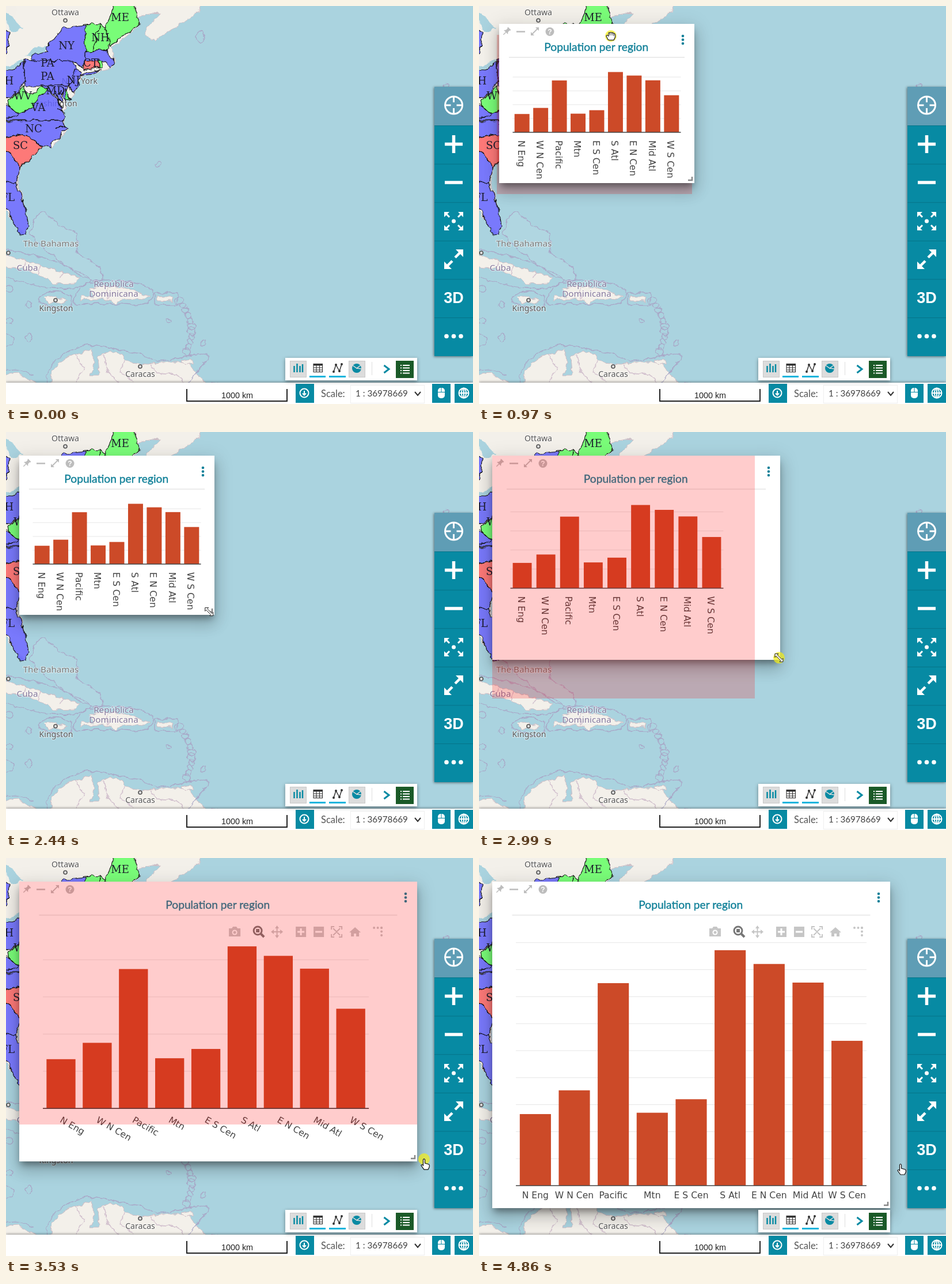
An HTML page for the animation above (5.18 s loop, 811x690 px).

```html
<!DOCTYPE html>
<html lang="en">
<head>
<meta charset="utf-8">
<title>Map dashboard</title>
<style>
html, body { margin: 0; width: 811px; height: 690px; overflow: hidden; }
#stage { position: relative; width: 811px; height: 690px; overflow: hidden; background: #aad3df; }
svg { position: absolute; left: 0; top: 0; overflow: visible; }
#panel, #drop { position: absolute; }
#panel {
  background: #fff; z-index: 2;
  box-shadow: 0 8px 11px -3px rgba(0,0,0,.38), 0 16px 24px 2px rgba(0,0,0,.15), 0 6px 30px 5px rgba(0,0,0,.1);
}
#drop { background: rgba(255,0,0,.2); }
#chrome { z-index: 4; }
#pointer { z-index: 5; }
.land { fill: #f3f0ea; stroke: #cdbcc4; stroke-width: 1; }
.sea { fill: none; stroke: #a9a5c6; stroke-width: 1.3; }
.inner { stroke: #cfbccb; }
.state { stroke: #111; stroke-width: 1.1; stroke-linejoin: round; }
.blue { fill: rgba(98,98,255,.84); }
.green { fill: rgba(98,255,98,.84); }
.red { fill: rgba(255,98,98,.84); }
.abbr { font: 18px "DejaVu Serif", serif; fill: #1c1c2c; text-anchor: middle; }
.town, .country { text-anchor: middle; paint-order: stroke; stroke: rgba(255,255,255,.55); stroke-width: 2px; }
.town { font: 14.1px "Noto Sans", sans-serif; fill: #555; }
.country { font: 15.2px "Noto Sans", sans-serif; fill: #83769a; }
.title { font: 19.2px Lato, sans-serif; fill: #128199; stroke: #128199; stroke-width: .4px; text-anchor: middle; }
.tick { font: 15.6px "DejaVu Sans", sans-serif; fill: #444; }
.tip { font: 16.9px "Liberation Sans", Arial, sans-serif; fill: #fff; text-anchor: middle; }
</style>
</head>
<body>
<div id="stage">
<svg id="map" width="811" height="690">
  <filter id="rough" x="0" y="0" width="811" height="690" filterUnits="userSpaceOnUse" color-interpolation-filters="sRGB">
    <feTurbulence type="fractalNoise" baseFrequency=".09" numOctaves="2" seed="4"/>
    <feDisplacementMap in="SourceGraphic" scale="9" xChannelSelector="R" yChannelSelector="G"/>
  </filter>
  <g filter="url(#rough)">
    <g class="land">
      <path d="M-9 -9H222L232 34 205 56 182 72 190 95 186 108 130 122 118 152 104 166 100 198 107 213 82 245 62 243 26 280 20 305 39 380 33 396 20 386 -9 340Z"/>
      <path d="M222 -9L228 20 252 12 268 13 246 36 240 48 258 60 290 38 312 27 336 8 342 -9Z"/>
      <path d="M-9 430L14 436 78 455 129 471 121 480 84 481 60 467 30 456 -9 452Z"/>
      <path d="M128 509L131 502 152 504 143 492 166 485 201 488 249 503 240 509 206 507 190 515 170 508Z"/>
      <path d="M67 506L84 502 106 512 92 517 75 514Z"/>
      <path d="M262 504L290 504 288 512 263 511Z"/>
      <path d="M76 660L80 631 104 610 130 602 150 594 152 620 146 640 162 640 160 604 184 599 201 606 215 619 246 621 274 617 318 617 326 633 357 660Z"/>
      <path d="M-9 641L18 636 40 648 62 660H-9Z"/>
      <path d="M304 614L321 611 325 619 312 622Z"/>
    </g>
    <path d="M33 86L48 73 74 68 70 80 48 88ZM-9 108L14 100 32 92 30 98 10 111ZM-9 8L16 22 28 40 8 46Z" fill="#aad3df"/>
    <g class="sea">
      <path d="M48 374Q54 356 68 358L96 382 121 392Q126 412 122 428L160 452Q172 468 166 480L134 470 96 444 60 416 42 394Z" fill="rgba(255,255,255,.08)"/>
      <path d="M-9 422Q60 430 104 450T146 478Q130 492 84 489T-9 466"/>
      <path d="M118 518Q116 494 140 482T212 478 256 500Q246 522 212 518T118 518M258 498H298V518H258Z"/>
      <path d="M56 508Q68 494 92 496T114 514 88 524 56 508"/>
      <path d="M72 653Q66 628 98 606T152 588 206 598 252 612 320 606 334 632 366 653"/>
      <path d="M-9 634Q20 624 46 640M-9 570Q16 566 14 580T-9 590"/>
      <path class="inner" d="M122 606L136 630 120 653M168 604L176 632 196 653M206 612L198 634 220 650M252 622L262 636 296 638 310 653M100 462L92 474M60 450L56 465M34 444L30 456M176 488V508"/>
      <g id="isles"></g>
    </g>
  </g>
  <g class="town">
    <text x="103" y="16">Ottawa</text><text x="128" y="135">New York</text><text x="84" y="174">Washington</text>
    <text x="87" y="529">Kingston</text><text x="233" y="643">Caracas</text>
  </g>
  <g class="country"><text x="78" y="417" fill="#777">The Bahamas</text><text x="37" y="459">Cuba</text><text x="187" y="487">República</text><text x="187" y="504">Dominicana</text></g>
  <g fill="#ddd" stroke="#555" stroke-width="1.6"><circle cx="103" cy="25" r="3"/><circle cx="86" cy="510" r="3"/><circle cx="233" cy="625" r="3"/><circle cx="4" cy="428" r="3"/></g>
  <g class="state" filter="url(#rough)">
    <g class="blue">
      <path d="M-9 30L4 48 2 78 -9 90Z"/>
      <path d="M43 94L46 86 74 80 70 70 82 58 98 38 137 33 139 70 136 96 133 108 119 96Z"/>
      <path d="M32 92L43 94 117 95 124 110 114 122 118 130 108 138H32Z"/>
      <path d="M-9 110L12 111 32 96V132L20 150 8 158 -9 157Z"/>
      <path d="M-9 198L24 187 44 178 58 156 72 145 82 156 94 168 102 190 98 198Z"/>
      <path d="M-9 158L5 175 24 187 -9 198Z"/>
      <path d="M60 138H106L106 156 114 160 104 165 96 150 98 166 88 158 72 145Z"/>
      <path d="M120 108L131 116 125 128 128 136 116 152 108 139 118 130 114 121Z"/>
      <path d="M-9 199L98 198 107 212 97 218 94 229 82 233 78 246 63 242 36 226 20 222 -9 231Z"/>
      <path d="M-9 246L8 256 25 280 18 305H-9Z"/>
      <path d="M-9 304L18 305 26 335 35 356 39 380 34 395 24 396 12 374 6 356 -9 340Z"/>
      <path d="M137 80L176 75 178 86 187 90 189 102 182 108 172 96 137 95Z"/>
      <path d="M128 121L142 114 166 110 150 118Z"/>
    </g>
    <g class="green">
      <path d="M31 138L33 150 46 151 60 140 73 144 58 156 46 176 24 187 5 175 3 163 20 152Z"/>
      <path d="M103 143L112 162 104 163Z"/>
      <path d="M137 33L163 31 157 50 151 78 138 81Z"/>
      <path d="M163 31L172 36 180 60 178 74 151 78 157 50Z"/>
      <path d="M172 38L183 14 188 -9H220L228 21 232 33 216 44 196 56 181 70Z"/>
      <path d="M160 93L168 94 166 106 161 107Z"/>
    </g>
    <g class="red"><path d="M135 95L160 93 161 106 136 111Z"/><path d="M-9 231L20 223 37 226 63 243 46 262 25 280 8 256 -9 246Z"/></g>
    <path d="M86 146L90 160 94 172M94 145L92 154M90 178L104 186M86 212L104 208M30 336L27 340" fill="none" stroke-width="2"/>
  </g>
  <g class="abbr">
    <text x="198" y="26">ME</text><text x="164" y="61">NH</text><text x="105" y="75">NY</text><text x="72" y="105">PA</text><text x="72" y="128">PA</text>
    <text x="147" y="105">CT</text><text x="117" y="135">NJ</text><text x="86" y="153">MD</text><text x="29" y="162">WV</text><text x="56" y="182">VA</text>
    <text x="48" y="219">NC</text><text x="25" y="248">SC</text><text x="-2" y="136">OH</text><text x="3" y="338">FL</text>
  </g>
</svg>
<div id="drop"></div>
<div id="panel"><svg id="chart" width="1" height="1"></svg></div>
<svg id="chrome" width="811" height="690">
  <rect y="653" width="811" height="37" fill="#fff" style="filter:drop-shadow(0 -1px 2px rgba(0,0,0,.4))"/>
  <path d="M314 664V685H488V664" fill="none" stroke="#222" stroke-width="2"/>
  <text x="401.5" y="680" text-anchor="middle" style="font:14.4px 'Liberation Sans',Arial,sans-serif" fill="#222">1000 km</text>
  <g fill="#078aa3"><rect x="503" y="655" width="32" height="33"/><rect x="740" y="655" width="32" height="33"/><rect x="779" y="655" width="32" height="33"/></g>
  <g fill="none" stroke="#fff" stroke-width="2">
    <circle cx="518" cy="671" r="7.5"/><path d="M518 667V674M515 671.5L518 674.5 521 671.5"/>
    <circle cx="795" cy="671" r="8.5"/><ellipse cx="795" cy="671" rx="4" ry="8.5"/><path d="M786.5 671H803.5M795 662.5V679.5"/>
  </g>
  <rect x="750" y="662" width="12" height="18" rx="5" fill="#fff"/><path d="M756 662V669M750 669.5H762" stroke="#078aa3"/>
  <g style="font:16.5px Lato,sans-serif" fill="#555"><text x="547" y="678">Scale:</text><text x="607" y="677" fill="#444" style="font-size:15.2px">1 : 36978669</text></g>
  <rect x="598.5" y="657.5" width="128" height="31" fill="none" stroke="#eee"/>
  <path d="M710 669L715 675 720 669" fill="none" stroke="#333" stroke-width="2"/>

  <rect x="485" y="610" width="229" height="39" fill="#fff" style="filter:drop-shadow(0 2px 3px rgba(0,0,0,.4))"/>
  <g fill="#dcdcdc" stroke="#c8c8c8"><rect x="493.5" y="615.5" width="28" height="28"/><rect x="595.5" y="615.5" width="28" height="28"/></g>
  <path d="M500.5 635V624M505.5 635V620M510.5 635V624M515 635V621" stroke="#078aa3" stroke-width="2.5"/>
  <path d="M527 642.5H555M561 642.5H590" stroke="#0fb4dc" stroke-width="3"/>
  <g fill="none" stroke="#333" stroke-width="1.1"><rect x="534" y="620.5" width="15.5" height="14"/><path d="M534 622H549.5" stroke-width="3"/><path d="M534 627H549.500M534 631H549.500M539 623V634M544.500 623V634"/><path d="M569 634L573 622 579 633 583 621" stroke-width="1.5"/></g>
  <g fill="#333"><circle cx="569" cy="634" r="2"/><circle cx="573" cy="622" r="2"/><circle cx="579" cy="633" r="2"/><circle cx="583" cy="621" r="2"/></g>
  <circle cx="609" cy="628" r="8" fill="#078aa3"/><path d="M617 622L609 628 602 623M609 628L617 629" stroke="#dcdcdc" stroke-width="1.5" fill="none"/>
  <path d="M635.5 617V640" stroke="#ddd"/><path d="M656.5 623L665 629.5 656.5 636" fill="none" stroke="#078aa3" stroke-width="3"/>
  <rect x="677" y="615" width="31" height="30" fill="#1b5a28"/>
  <g id="list"></g>

  <rect x="744" y="140" width="67" height="467" fill="#078aa3" style="filter:drop-shadow(-1px 1px 2px rgba(0,0,0,.5))"/>
  <rect x="744" y="140" width="67" height="67" fill="#5f9db5"/>
  <g id="cells"></g>
  <g fill="none" stroke="#fff" stroke-width="3">
    <circle cx="777.5" cy="172" r="15"/><path d="M777.5 157V167M777.5 177V187M762.5 172H772.5M782.5 172H792.5"/>
    <path d="M762 239.5H793M777.5 224V255M762 306H793" stroke-width="5.5"/>
    <path d="M770 366L763 359M785 366L792 359M770 380L763 387M785 380L792 387"/>
    <path d="M780 436L790 426M775 442L765 452" stroke-width="4.5"/>
  </g>
  <g fill="#fff">
    <path d="M761 357H770L761 366ZM794 357V366L785 357ZM761 389V380L770 389ZM794 389H785L794 380Z"/><circle cx="777.5" cy="373" r="3.5"/>
    <path d="M794 422V435L781 422ZM761 456V443L774 456Z"/>
    <text x="777.5" y="515" text-anchor="middle" style="font:bold 27px 'Liberation Sans',Arial,sans-serif">3D</text>
  </g>
</svg>
<svg id="pointer" width="811" height="690"></svg>
</div>
<script>
const $ = id => document.getElementById(id);
const LOOP = 5180, STEP = 77.8, PHASE = 20;
const REGIONS = {
  'N Eng': 13.25, 'W N Cen': 17.65, 'Pacific': 37.5, 'Mtn': 13.5, 'E S Cen': 16,
  'S Atl': 43.6, 'E N Cen': 41.05, 'Mid Atl': 37.60229, 'W S Cen': 26.82
};
const TOP = 45.88;
const BAR = '#cc4a28';
const HOME = [23, 41], CELL = [117.4, 145], BASE = [339, 276];
const START = [258, 331];

const prog = (t, a, b) => Math.min(1, Math.max(0, (t - a) / (b - a)));
const smooth = p => p * p * (3 - 2 * p);
const mix = (a, b, p) => a.map((v, i) => v + (b[i] - v) * p);
const ramp = (from, to, t, start, rate) => Math.min(to, from + Math.max(0, t - start) * rate);

const text = (cls, x, y, s, extra = '') => `<text class="${cls}" x="${x}" y="${y}" ${extra}>${s}</text>`;
const rect = (x, y, w, h, fill) => `<rect x="${x}" y="${y}" width="${w}" height="${h}" fill="${fill}"/>`;
const line = (d, color, w = 1) => `<path d="${d}" fill="none" stroke="${color}" stroke-width="${w}"/>`;
const dot = (x, y, r, fill) => `<circle cx="${x}" cy="${y}" r="${r}" fill="${fill}"/>`;
const repeat = (n, f) => Array.from({ length: n }, (_, i) => f(i)).join('');

// Dragged by the pointer, then settling into the grid.
function position(t) {
  const dragged = mix(START, [35, 31], smooth(prog(t, 440, 953)));
  return mix(dragged, HOME, prog(t, 953, 1187));
}

const settle = t => 70 * prog(t, 4066, 4221);
const panelSize = t => [ramp(339, 691, t, 2694, .57), ramp(276, 496, t, 2650, .24) + settle(t)];
// The plot redraws more slowly than the panel grows.
const plotSize = t => [ramp(339, 691, t, 2760, .4), ramp(276, 496, t, 2820, .267) + settle(t)];

function mouse(t) {
  if (t < 440) return mix([465, 385], [452, 352], prog(t, 20, 176));
  if (t < 1000) return position(t).map((v, i) => v + [194, 21][i]);
  if (t < 2700) {
    const p = prog(t, 1255, 1720), swing = Math.sin(Math.PI * prog(t, 1890, 2440));
    return [229 + 123 * Math.sin(p * Math.PI / 2) + 15 * swing, 52 + 258 * p + 34 * swing];
  }
  const reach = 726 + 6 * prog(t, 3521, 3850);
  return [ramp(360, reach, t, 2694, .57), Math.min(531, 37 + panelSize(t)[1])];
}

function header(w, h) {
  const g = '#bdbdbd';
  return `<g transform="translate(13 13) rotate(45)"><path d="M-3.5 -7H3.5V-5H2.5V-1L5 2H-5L-2.5 -1V-5H-3.5Z" fill="${g}"/>${line('M0 2V8', g, 1.5)}</g>` +
    line('M30 13.5H45', g, 2.5) + line('M57 18L67 8', g, 1.8) +
    `<path d="M69 6V12L63 6ZM55 20V14L61 20Z" fill="${g}"/>` + dot(88, 13.5, 7.5, g) +
    text('tip', 88, 18, '?', 'style="font-size:12px;font-weight:bold"') +
    repeat(3, i => dot(w - 20, 21 + 6.5 * i, 2.3, '#128199')) +
    text('title', w / 2 - .8, 47, 'Population per region') +
    line(`M${w * .05} 58H${w * .95}`, '#d8d8d8') + line(`M${w - 11} ${h - 5}H${w - 4}V${h - 11}`, '#888', 2.5);
}

function modebar(x) {
  const g = '#c6c6c6';
  const button = (dx, d) => rect(dx - 9, -9, 18, 18, g) + line(`M${dx - 6} 0h12${d}`, '#fff', 3);
  return `<g transform="translate(${x} 87)">` +
    `<path d="M-10 -6H-5L-3 -9H3L5 -6H10V8H-10Z" fill="${g}"/>` + dot(0, 1, 4.5, '#fff') + dot(0, 1, 2.5, g) +
    `<circle cx="40" cy="-2" r="7" fill="none" stroke="#777" stroke-width="3"/>` + line('M45 3L51 9', '#777', 4) + rect(37, -5, 6, 6, '#777') +
    line('M65 0H82M73.5 -8V8', g, 2) + `<path d="M73.5 -11L77 -6H70ZM73.5 11L77 6H70ZM63 0L68 -4V4ZM84 0L79 -4V4Z" fill="${g}"/>` +
    button(115, 'm-6 -6v12') + button(146, '') +
    line('M168 -4V-9H173M181 -9H186V-4M186 4V9H181M173 9H168V4M171 -6L183 6M183 -6L171 6', g, 2) +
    `<path d="M199 1L209 -8 219 1H216V8H211V3H207V8H202V1Z" fill="${g}"/>` +
    repeat(3, i => dot(242 + 6.5 * i, -7, 2, g) + dot(255, -7 + 6.5 * i, 2, g)) + '</g>';
}

function tooltip(x, y, left, axis) {
  return `<path d="M${left} ${y}l-6 -6v-7h-93v26h93v-7Z" fill="${BAR}" stroke="#fff"/>` +
    text('tip', left - 53, y + 6, '37.60229M') +
    `<path d="M${x} ${axis + 1}l6 7h23v26h-58v-26h23Z" fill="#444" stroke="#fff"/>` +
    text('tip', x, axis + 27, 'Mid Atl');
}

function chart(t) {
  const [w, h] = panelSize(t), [cw, ch] = plotSize(t);
  const x0 = w * .05 + 6.5, pw = cw * .9 - 13, pitch = pw / 9;
  const tilt = pitch < 50 ? 90 : pitch < 67 ? 30 : 0;
  const axis = ch - { 90: 88, 30: 70, 0: 39 }[tilt];
  const unit = (axis - (tilt === 90 ? 78 : 97.5)) / TOP;
  const gap = unit > 9 ? 5 : 10;
  let out = header(w, h), tip = '';
  for (let v = gap; v < TOP; v += gap) out += line(`M${x0} ${axis - v * unit}h${pw}`, '#e6e6e6');
  Object.entries(REGIONS).forEach(([name, value], i) => {
    const cx = x0 + pitch * (i + .5), bh = value * unit, left = cx - pitch * .4;
    out += rect(left, axis - bh, pitch * .8, bh, BAR);
    const [lx, ly] = tilt === 90 ? [cx - 7, axis + 14] : tilt ? [cx - 3, axis + 23] : [cx, axis + 22];
    out += text('tick', lx, ly, name, tilt ? `transform="rotate(${tilt} ${lx} ${ly})"` : 'text-anchor="middle"');
    if (name === 'Mid Atl' && t > 1400 && t < 1600) tip = tooltip(cx, axis - bh, left, axis);
  });
  out += line(`M${x0} ${axis}h${pw}`, '#444', 1.6);
  if (tilt < 90) out += modebar(387 - (691 - cw) * .27);
  return out + tip;
}

const SHAPES = {
  grab: '<path d="M-5 6L-8 0Q-7 -3 -4 0V-5Q-3 -7 -1.5 -5 0 -8 2 -5 4 -7 5 -4 7 -5 7.5 -2V2L5 7H-3Z" fill="#fff" stroke="#222" stroke-width="1.2"/><path d="M-1.5 -5V-1M2 -5V-1M5 -4V0" stroke="#222"/>',
  cross: '<path d="M-10 0H10M0 -10V10" stroke="#22b5e0" stroke-width="2"/>',
  arrow: '<path d="M0 0V15L4 12 6.5 18 9 17 6.5 11H11Z" fill="#fff" stroke="#111"/>',
  size: '<path d="M-7 -7H-1L-3 -5 5 3 7 1V7H1L3 5 -5 -3 -7 -1Z" fill="#fff" stroke="#222"/>',
  hand: '<path d="M-1.5 1Q0 -2 1.5 1V7L8 9Q10 10 9 14L7 18H0L-5 11Q-4 8 -1.5 11Z" fill="#fff" stroke="#111" stroke-width="1.2"/>'
};

function pointer(t) {
  const [x, y] = mouse(t);
  const outside = t < 2600 && y > 317;
  const shape = t < 1400 ? 'grab' : t < 1700 ? 'cross' : outside ? 'arrow' : x < 720 ? 'size' : 'hand';
  const lit = t > 170 && t < 1100 || t > 2570 && t < 4060;
  return `<g transform="translate(${x} ${y})">${lit ? dot(0, 0, 10, 'rgba(245,238,20,.7)') : ''}${SHAPES[shape]}</g>`;
}

function place(el, [x, y], [w, h]) {
  Object.assign(el.style, { left: x + 'px', top: y + 'px', width: w + 'px', height: h + 'px' });
}

function draw(t) {
  const size = panelSize(t), drop = $('drop');
  place($('panel'), position(t), size);
  $('chart').innerHTML = chart(t);
  $('pointer').innerHTML = pointer(t);
  const moving = t > 440 && t < 1100, sizing = t > 2700 && t < 4200;
  drop.style.display = moving || sizing ? 'block' : 'none';
  drop.style.zIndex = sizing ? 3 : 1;
  // The drop zone always covers whole grid cells.
  const snapped = size.map((v, i) => BASE[i] + Math.round((v - BASE[i]) / CELL[i]) * CELL[i]);
  place(drop, mix(HOME, START, (1 - prog(t, 600, 1031)) ** 2), snapped);
}

let seed = 7;
const random = () => (seed = seed * 16807 % 2147483647) / 2147483647;
const ring = (x, y, r) => `<ellipse cx="${x}" cy="${y}" rx="${r}" ry="${r * (.6 + .5 * random())}"/>`;
$('isles').innerHTML = ring(265, 274, 6) + ring(337, 53, 8) + ring(764, 137, 5) + ring(282, 546, 4) + ring(342, 584, 5) +
  repeat(4, i => ring(6 + 34 * (i % 2), 490 + 28 * i, 6)) +
  repeat(11, i => ring(298 + 22 * Math.sin(i / 4) + 4 * random(), 510 + i * 9, 4 + 4 * random()));
$('list').innerHTML = repeat(4, i => line(`M685 ${623 + 4.5 * i}h2m2 0h12`, '#fff', 2));
$('cells').innerHTML = repeat(6, i => line(`M744 ${207.5 + 66.6 * i}h67`, '#067489')) +
  repeat(3, i => dot(765 + 12.5 * i, 572.5, 3.8, '#fff'));

let shown = -1;
function frame(now) {
  const n = Math.floor((now % LOOP - PHASE) / STEP);
  if (n !== shown) draw(Math.max(0, PHASE + STEP * (shown = n)));
  requestAnimationFrame(frame);
}
frame(0);
</script>
</body>
</html>
```
